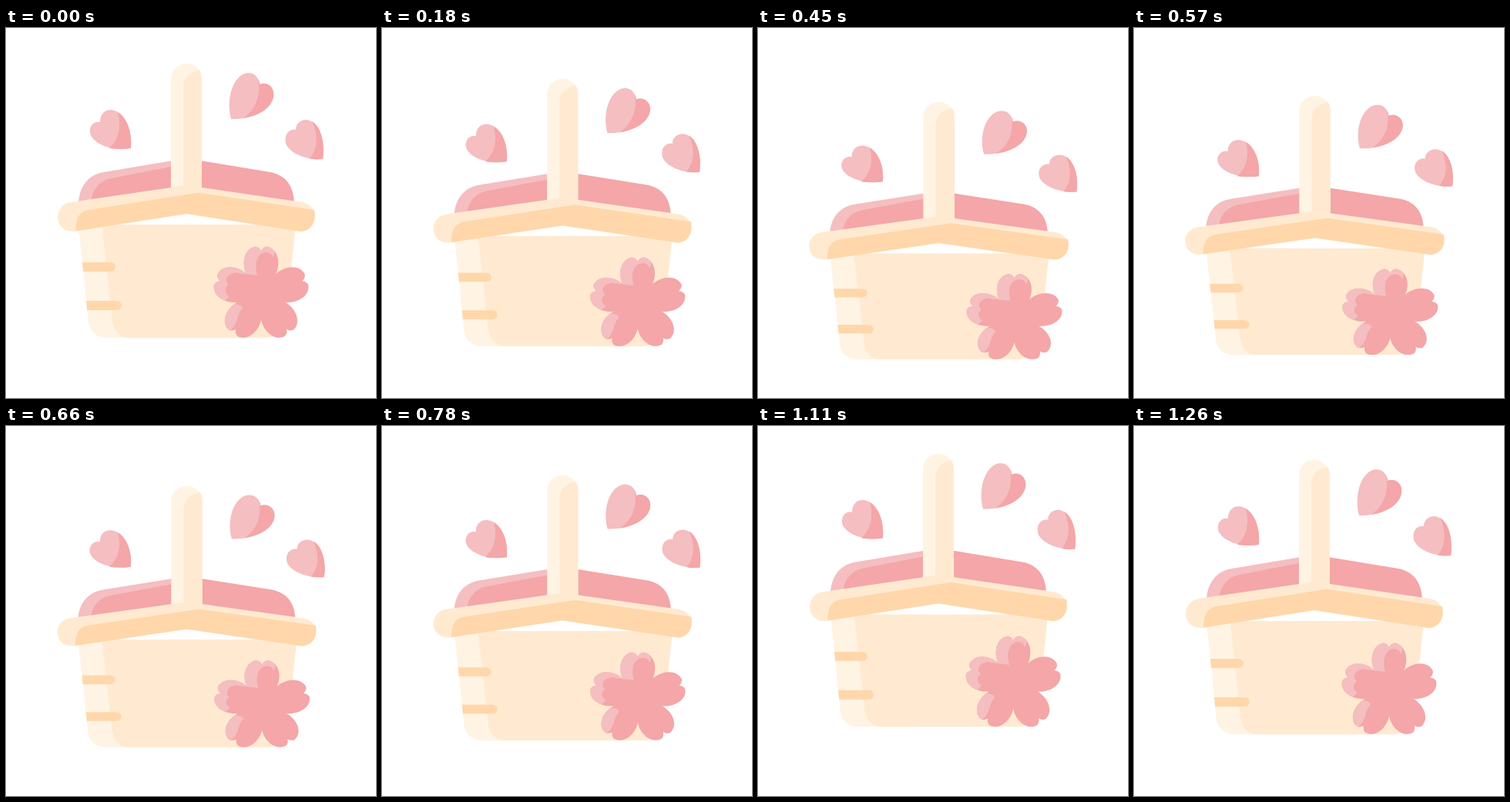
An HTML page for the animation above (1290 ms loop, 480 px wide and 480 px high).

```html
<!DOCTYPE html>
<html>
<head>
<meta charset="utf-8">
<style>
  html, body { margin: 0; width: 100%; height: 100%; overflow: hidden; background: #fff; }
  svg { display: block; width: 100%; height: 100%; }
  .cream { fill: #ffead1; }
  .pale { fill: #fff3e3; }
  .tan { fill: #ffd7ab; }
  .pink { fill: #f4a6a8; }
  .blush { fill: #f5bec0; }
</style>
</head>
<body>
<svg viewBox="0 0 480 480">
  <defs>
    <path id="petal" d="M0 0L-19-26C-26-40-22-60-7-62Q-2-61 0-56Q2-61 7-62C22-60 26-40 19-26Z"/>
    <clipPath id="flower"></clipPath>
    <clipPath id="body"><path d="M94 255L107 383C109 395 118 402 132 402H336C350 402 361 393 363 381L376 255Z"/></clipPath>
  </defs>
  <g id="scene">
    <!-- cloth -->
    <path class="blush" d="M94 230C94 206 107 190 127 187L234 169V230Z"/>
    <path class="pink" d="M110 230C111 210 121 198 137 195L214 180L234 169L343 187C363 191 374 205 374 230Z"/>

    <!-- basket -->
    <g clip-path="url(#body)">
      <path class="pale" d="M80 230H200V410H80Z"/>
      <path class="cream" d="M124 250L138 380C140 394 148 402 160 402H390V230Z"/>
      <path class="tan" d="M80 304H136a6 6 0 0 1 0 12H80ZM80 354H144a6 6 0 0 1 0 12H80Z"/>
    </g>

    <!-- handle and rim -->
    <path class="pale" d="M214 215V66a20 20 0 0 1 40 0V215Z"/>
    <path class="cream" d="M230 215V79C230 64 239 56 251.500 55Q254 60 254 66V215Z"/>
    <path class="cream" d="M84 226L234 204L384 226C407 230 406 263 382 264L234 241L88 264C61 265 61 229 84 226Z"/>
    <path class="tan" d="M90.500 263.500C90 247 95 238 107 236L250 213.500L400 236C403 250 396 264 382 264L234 241Z"/>

    <!-- loose petals -->
    <path class="blush" d="M292 118C287 100 290 76 302 64C312 54 327 57 329 73C339 69 349 77 347 89C344 108 318 119 292 118Z"/>
    <path class="pink" d="M327 66Q329 69 329 73C339 69 349 77 347 89C344 104 327 114 308 117C325 105 331 86 327 66Z"/>
    <path class="blush" d="M162 156C140 160 116 152 110 139C106 128 114 120 122 122C122 109 132 103 143 108C157 115 164 136 162 156Z"/>
    <path class="pink" d="M145 109C157 116 164 136 162 156Q147 158 134 156C147 145 150 126 145 109Z"/>
    <path class="blush" d="M411 170C390 172 370 163 364 152C359 140 367 130 376 132C376 123 383 119 390 119C406 121 415 148 411 170Z"/>
    <path class="pink" d="M397 121C409 128 414 150 411 170Q402 171 394 169.500C405 157 405 138 397 121Z"/>

    <!-- blossom -->
    <g clip-path="url(#flower)">
      <path class="pink" d="M260 275H400V410H260Z"/>
      <path class="blush" d="M326 321C321 302 328 291 338 291Q345 292 346 298C351 290 348 281 340 278H300V318Z"/>
      <path class="blush" d="M326 321Q309 317 300 317C287 318 282 327 289 333C283 337 284 345 290 348L280 358H255V300H310Z"/>
      <path class="blush" d="M307 364C299 370 302 385 291 392H275V362L297 358Q307 359 307 364Z"/>
    </g>
  </g>
</svg>
<script>
  const LOOP = 1290, START = 480, HEIGHT = 356, TOP = 46, PIVOT = 170;
  const scene = document.getElementById('scene');
  const flower = document.getElementById('flower');

  for (let i = 0; i < 5; i++) {
    const petal = document.createElementNS('http://www.w3.org/2000/svg', 'use');
    petal.setAttribute('href', '#petal');
    petal.setAttribute('transform', `translate(331 345.500) rotate(${i * 72})`);
    flower.append(petal);
  }

  // [time, top edge, bottom edge], from one landing to the next
  const keys = [
    [480, 98.8, 432], [660, 78, 417], [780, 64, 408], [960, 45, 395], [1110, 36, 390.5],
    [1260, 44, 400], [1290, 46, 402], [1470, 66, 413], [1740, 96, 430], [1770, 98.8, 432]
  ];

  function slope(i, c) {
    const a = keys[Math.max(i - 1, 0)], b = keys[Math.min(i + 1, keys.length - 1)];
    return (b[c] - a[c]) / (b[0] - a[0]);
  }

  // Smooth curve through the keys, with a sharp turn at the landing
  function valueAt(t, c) {
    let i = 0;
    while (i < keys.length - 2 && t >= keys[i + 1][0]) i++;
    const a = keys[i], b = keys[i + 1], span = b[0] - a[0];
    const u = (t - a[0]) / span, v = 1 - u;
    return v * v * (1 + 2 * u) * a[c] + u * u * (1 + 2 * v) * b[c]
      + span * u * v * (v * slope(i, c) - u * slope(i + 1, c));
  }

  function draw(now) {
    const t = now % LOOP;
    const time = t < START ? t + LOOP : t;
    const top = valueAt(time, 1);
    const sy = (valueAt(time, 2) - top) / HEIGHT;
    const sx = 1 + (1 - sy) * 0.15;
    scene.setAttribute('transform',
      `matrix(${sx} 0 0 ${sy} ${PIVOT * (1 - sx)} ${top - TOP * sy})`);
  }

  const origin = performance.now();
  function tick() {
    draw(performance.now() - origin);
    requestAnimationFrame(tick);
  }
  tick();
</script>
</body>
</html>
```
